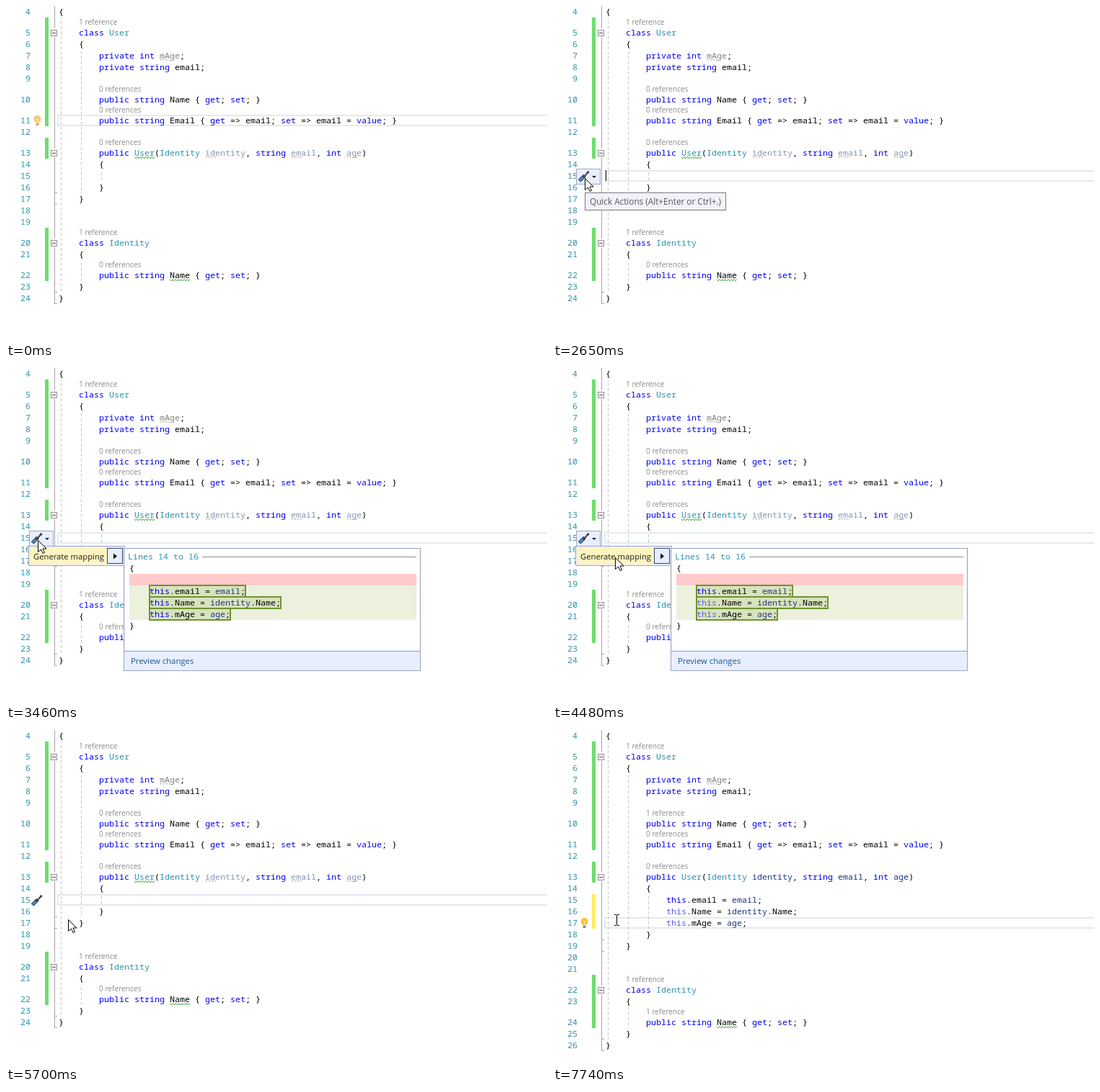
An HTML page with a canvas for the animation above (8000 ms loop, 750 by 464 pixels).

```html
<!DOCTYPE html>
<html lang="en">
<head>
<meta charset="utf-8">
<title>Generate mapping</title>
<style>
html, body { margin: 0; width: 100%; height: 100%; overflow: hidden; background: #fff; }
canvas { display: block; }
</style>
</head>
<body>
<canvas id="stage" width="750" height="464"></canvas>
<script>
const ctx = document.getElementById('stage').getContext('2d', { alpha: false });
const LOOP = 8000;
const MONO = '11.667px "Noto Sans Mono", "DejaVu Sans Mono", monospace';
const ui = size => `${size}px "Open Sans", "Noto Sans", sans-serif`;
const CHAR = 7, ROW = 16, LENS = 13, LEFT = 73, INDENT = 28;

const BLUE = '#0000f0', TEAL = '#2b91af', PARAM = '#1f377f', FADED = '#8797b5';
const PANEL = '#e9eefe', EDGE = '#9ba7be';
const KEYWORDS = new Set('class private public int string get set value this'.split(' '));
const TYPES = new Set(['User', 'Identity']);

// Start time, pointer position and shape
const POINTER = [
  [0, 0, 0, ''], [200, 358, 371, 'beam'], [410, 318, 322, 'beam'], [610, 240, 275, 'beam'],
  [820, 180, 245, 'beam'], [1020, 154, 237, 'beam'], [1630, 128, 238, 'beam'],
  [1840, 92, 240, 'beam'], [2040, 58, 241, 'arrow'], [2240, 46, 240, 'arrow'],
  [2450, 44, 239, 'arrow'], [3670, 60, 248, 'arrow'], [3870, 78, 259, 'arrow'],
  [4080, 86, 263, 'arrow'], [5910, 88, 264, 'beam']
];
const CARET = [[1430, 2040], [2450, 3060], [5910, 6510], [7130, 7740]];
const CLICKS = [[1220, 1430], [2850, 3060], [5500, 5700]];

const within = (t, spans) => spans.some(([a, b]) => t >= a && t < b);

function rect(x, y, w, h, color) {
  ctx.fillStyle = color;
  ctx.fillRect(x, y, w, h);
}

function box(x, y, w, h, fill, edge) {
  rect(x, y, w, h, edge);
  rect(x + 1, y + 1, w - 2, h - 2, fill);
}

function label(s, x, y, color, font) {
  ctx.font = font;
  ctx.fillStyle = color;
  ctx.fillText(s, x, y);
}

function poly(points, fill, stroke) {
  ctx.beginPath();
  points.forEach(([x, y]) => ctx.lineTo(x, y));
  ctx.closePath();
  ctx.fillStyle = fill;
  ctx.fill();
  if (stroke) {
    ctx.strokeStyle = stroke;
    ctx.lineWidth = 1;
    ctx.stroke();
  }
}

function line(x1, y1, x2, y2, color, width = 1) {
  ctx.beginPath();
  ctx.moveTo(x1, y1);
  ctx.lineTo(x2, y2);
  ctx.strokeStyle = color;
  ctx.lineWidth = width;
  ctx.stroke();
}

// Prefixes: ~ parameter, % unused field, ^ redundant keyword
function code(s, x, mid, opt) {
  for (const [, mark, word] of s.matchAll(/([~%^]?)(\w+|[^\w~%^]+)/g)) {
    let color = '#000';
    if (mark === '~') color = opt.param;
    else if (mark === '%') color = '#85807c';
    else if (mark === '^' && opt.dimThis) color = '#5c5ce8';
    else if (KEYWORDS.has(word)) color = BLUE;
    else if (TYPES.has(word)) color = TEAL;
    label(word, x, mid + 4, color, MONO);
    if (mark === '%' || (mark === '~' && opt.hint)) {
      for (let i = 0; i < 4; i++) rect(x + 1 + i * 4, mid + 5, 1.5, 1.5, '#a3a3a3');
    }
    x += word.length * CHAR;
  }
}

function squiggle(x, y, w) {
  ctx.beginPath();
  for (let i = 0; i <= w; i += 2) ctx.lineTo(x + i, y + (i % 4 ? 2.5 : 0));
  ctx.strokeStyle = '#45a845';
  ctx.lineWidth = 1;
  ctx.stroke();
}

// Each line: text, reference count, change bar
function source(t) {
  const done = t >= 5910;
  const refs = t >= 6310 ? 1 : 0;
  const body = done
    ? ['this.email = ~email;', '^this.Name = ~identity.Name;', '^this.mAge = ~age;'].map(s => [s, , t >= 6110 ? 'new' : ''])
    : [['']];
  return [
    ['{'],
    ['class User', 1, 'saved'],
    ['{', , 'saved'],
    ['private int %mAge;', , 'saved'],
    ['private string email;', , 'saved'],
    ['', , 'saved'],
    ['public string Name { get; set; }', refs, 'saved'],
    ['public string Email { get => email; set => email = value; }', 0, 'saved'],
    [''],
    ['public User(Identity ~identity, string ~email, int ~age)', 0, 'saved'],
    ['{'], ...body, ['}'], ['}'], [''], [''],
    ['class Identity', 1, 'saved'],
    ['{', , 'saved'],
    ['public string Name { get; set; }', refs, 'saved'],
    ['}'], ['}']
  ];
}

function layout(t) {
  let y = 0, depth = 0;
  return source(t).map(([text, refs, bar], i) => {
    const top = y, lens = refs !== undefined;
    if (text === '}') depth--;
    if (lens) y += LENS;
    const row = { text, refs, bar, lens, top, depth, num: i + 4, mid: y + 8, bottom: y + ROW };
    if (text === '{') depth++;
    y += ROW;
    return row;
  });
}

function drawRow(r, t) {
  const x = LEFT + INDENT * r.depth, analysed = t >= 6720;
  if (r.bar) rect(54, r.top, 5, r.bottom - r.top, r.bar === 'new' ? '#ffee62' : '#6cdf6c');
  label(String(r.num), 34 - CHAR * String(r.num).length, r.mid + 4, TEAL, MONO);

  ctx.setLineDash([4, 3]);
  ctx.lineDashOffset = r.top;
  for (let k = 0; k < r.depth; k++) {
    line(76.5 + INDENT * k, r.top, 76.5 + INDENT * k, r.bottom, '#c6c6c6');
  }
  ctx.setLineDash([]);

  if (r.lens) label(r.refs ? '1 reference' : '0 references', x, r.mid - 11, '#8a8a8a', ui(10.15));
  const signature = r.text.startsWith('public User');
  const early = signature && !analysed;
  code(r.text, x, r.mid, { param: early ? FADED : PARAM, hint: early, dimThis: analysed });
  if (early) squiggle(x + 49, r.mid + 5.5, 28);
  if (r.num > 19 && r.text.startsWith('public')) squiggle(x + 98, r.mid + 5.5, 28);

  if (r.text === '}') rect(67, r.mid + 7, 4, 1, '#a5a5a5');
  if (signature || r.text.startsWith('class')) {
    rect(61, r.mid - 6, 12, 12, '#fff');
    box(62, r.mid - 4, 9, 9, '#fff', '#8f8f8f');
    rect(64, r.mid, 5, 1, '#555');
  }
}

function bulb(mid, color, base) {
  ctx.beginPath();
  ctx.arc(43.5, mid - 2, 5, 0, Math.PI * 2);
  ctx.fillStyle = color;
  ctx.fill();
  rect(41.5, mid + 1, 4, 3, color);
  line(42, mid - 3, 43.5, mid - 1, '#fff4d8');
  line(45, mid - 3, 43.5, mid - 1, '#fff4d8');
  line(43.5, mid - 1, 43.5, mid + 3, '#fff4d8');
  rect(41.5, mid + 4, 4, 3, base);
}

function screwdriver() {
  line(49.5, 230, 43, 237, '#424242', 2);
  line(47.5, 232, 49.5, 230, '#424242', 3);
  line(44, 235.5, 36.5, 243, '#424242', 5);
  line(41.5, 238, 37, 242.5, '#3f8fd0', 3);
}

function actionButton() {
  box(32, 226, 34, 22, PANEL, EDGE);
  screwdriver();
  poly([[54, 236], [60, 236], [57, 239]], '#1e1e1e');
}

function menu() {
  box(31, 247, 134, 28, PANEL, EDGE);
  rect(33, 249, 107, 24, '#fdf4bf');
  label('Generate mapping', 38, 266, '#1e1e1e', ui(11.25));
  box(140, 250, 22, 22, PANEL, '#33476f');
  poly([[149, 257.5], [154, 261.5], [149, 265.5]], '#111');
}

function preview(t) {
  box(163, 250, 412, 171, PANEL, EDGE);
  rect(165, 252, 408, 140, '#fff');
  rect(164, 393, 410, 1, EDGE);
  label('Lines 14 to 16', 169, 266, TEAL, MONO);
  rect(272, 262, 297, 1, '#8c8c8c');
  rect(171, 286, 398, 16, '#ffcbcb');
  rect(171, 302, 398, 48, '#ebf1dd');
  const opt = { param: PARAM, dimThis: t >= 4480 };
  const added = ['this.email = ~email;', '^this.Name = ~identity.Name;', '^this.mAge = ~age;'];
  code('{', 171, 278, opt);
  added.forEach((s, i) => {
    const w = s.replace(/[~^]/g, '').length * CHAR;
    rect(198, 301 + i * ROW, w + 2, 18, '#6f9232');
    rect(200, 303 + i * ROW, w - 2, 14, '#d7e3bc');
  });
  added.forEach((s, i) => code(s, 199, 310 + i * ROW, opt));
  code('}', 171, 358, opt);
  label('Preview changes', 173, 411, '#0e5a9c', ui(11.33));
}

function tooltip() {
  box(44, 259, 196, 25, '#f1f2f9', '#767a85');
  label('Quick Actions (Alt+Enter or Ctrl+.)', 51, 276, '#575757', ui(11.75));
}

function pointer(t) {
  const [, x, y, shape] = POINTER.findLast(p => p[0] <= t);
  if (within(t, CLICKS)) {
    ctx.globalCompositeOperation = 'multiply';
    ctx.beginPath();
    ctx.arc(x + 0.5, y, 12, 0, Math.PI * 2);
    ctx.fillStyle = '#fff02c';
    ctx.fill();
    ctx.globalCompositeOperation = 'source-over';
  }
  if (shape === 'beam') {
    rect(x, y - 7, 1, 14, '#000');
    for (const end of [y - 8, y + 7]) {
      rect(x - 3, end, 3, 1, '#000');
      rect(x + 1, end, 3, 1, '#000');
    }
  } else if (shape === 'arrow') {
    const tip = [[0, 0], [0, 16], [4, 12.5], [6.5, 18], [9, 17], [6.5, 11.5], [11.5, 11.5]];
    poly(tip.map(([a, b]) => [x + 0.5 + a, y + 0.5 + b]), '#fff', '#000');
  }
}

function draw(t) {
  rect(0, 0, 750, 464, '#fff');
  const rows = layout(t);
  const current = rows.find(r => r.num === (t < 1430 ? 11 : t < 5910 ? 15 : 17));
  ctx.strokeStyle = t < 1430 ? '#e9e9eb' : '#e6e8f1';
  ctx.lineWidth = 2;
  ctx.strokeRect(72, current.mid - 7, 700, 14);
  rect(67, 0, 1, rows[rows.length - 1].bottom - 1, '#a5a5a5');
  rows.forEach(r => drawRow(r, t));

  if (within(t, CARET)) rect(t < 5910 ? 73 : 269, current.mid - 8, 1, 15, '#000');
  if (t < 1430) bulb(current.mid, '#f6c67c', '#d9a860');
  if (t >= 6720) bulb(current.mid, '#fdc02f', '#8b8a80');
  if (within(t, [[1840, 2240], [5700, 5910]])) screwdriver();
  if (within(t, [[2240, 5700]])) actionButton();
  if (within(t, [[2650, 3060]])) tooltip();
  if (within(t, [[3060, 5700]])) menu();
  if (within(t, [[3460, 5700]])) preview(t);
  pointer(t);
}

const start = performance.now();
function tick() {
  draw((performance.now() - start) % LOOP);
  requestAnimationFrame(tick);
}
tick();
</script>
</body>
</html>
```
